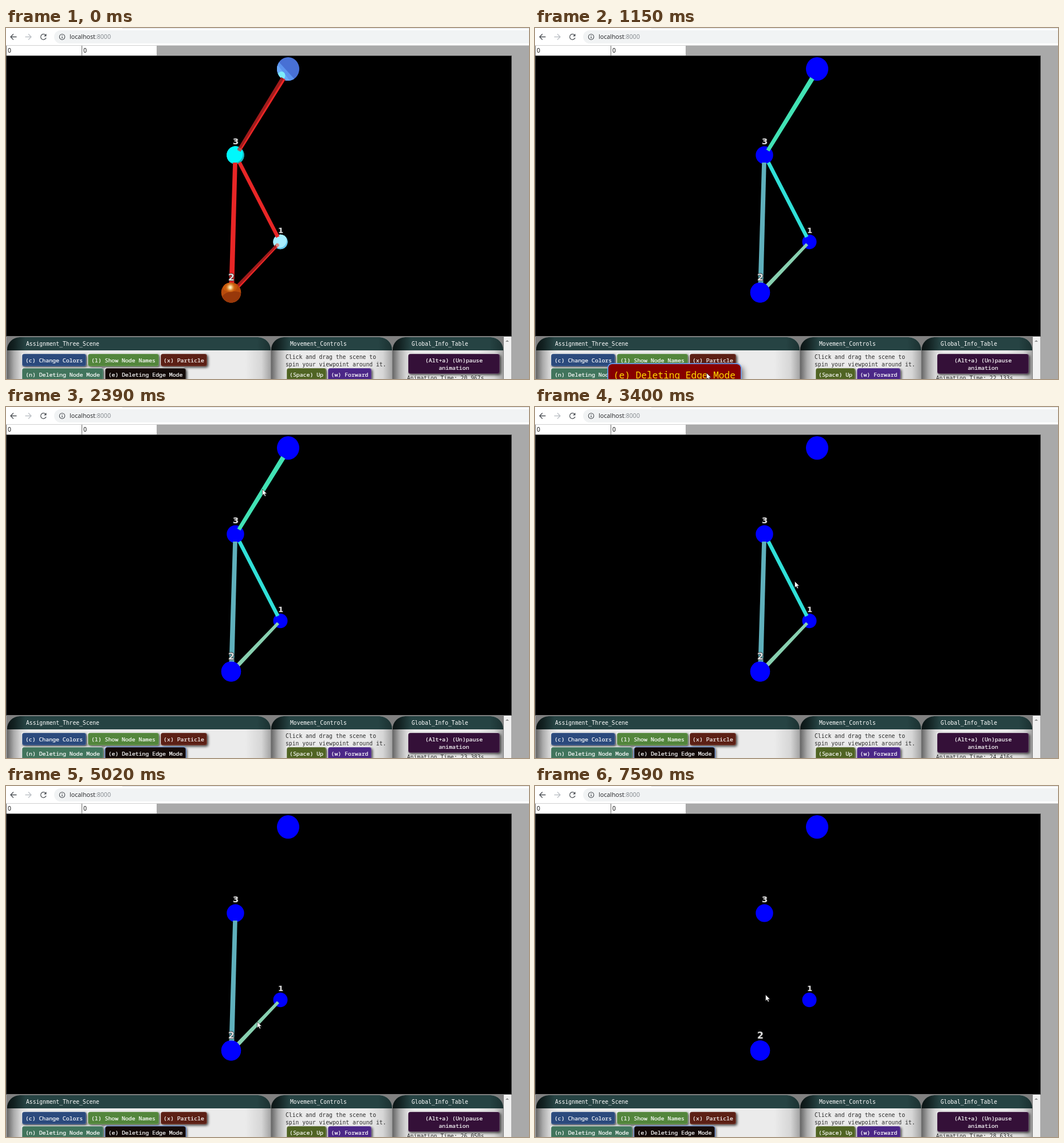
These frames come from a looping animation (913 by 613 pixels, 7.7 s). An HTML page with a canvas:

```html
<!DOCTYPE html>
<html lang="en">
<head>
<meta charset="utf-8">
<title>Scene viewer</title>
<style>
html, body { margin: 0; width: 100%; height: 100%; overflow: hidden; background: #a9a9a9; }
#stage { position: relative; width: 913px; height: 613px; overflow: hidden; background: #a9a9a9; }
#stage * { box-sizing: border-box; }
#stage > *, .panel > * { position: absolute; }
#bar { left: 0; top: 0; width: 913px; height: 31px; background: #fff; border-bottom: 1px solid #d0d0d0; }
#bar > * { position: absolute; }
#rim { left: 203px; top: 0; width: 710px; height: 1px; background: #dee1e6; }
#pill { left: 84px; top: 4px; width: 850px; height: 23px; border-radius: 12px; background: #f1f3f4; }
#url { left: 111px; top: 7px; font: 10.7px/16px "Open Sans", "Noto Sans", sans-serif; color: #202124; }
#url span { color: #80868b; }
.field { top: 31px; height: 17px; background: #fff; border-left: 1px solid #666;
  font: 10.5px/16px "Noto Sans", sans-serif; padding-left: 2px; color: #111; }
#scene { left: 1px; top: 49px; box-shadow: 0 0 0 1px #555; }
#dock { left: 1px; top: 538px; width: 868px; height: 75px; background: #808080; }
.panel { top: 540px; height: 90px; border-radius: 22px 22px 0 0; overflow: hidden;
  background: linear-gradient(90deg, #666, #acacac 12px, #d8d8d8 24px, #ebebeb 38px,
    #ebebeb calc(100% - 44px), #d6d6d6 calc(100% - 16px), #a4a4a4); }
.panel h2 { left: 0; top: 0; width: 100%; height: 23px; margin: 0; padding-left: 33px; color: #fff;
  font: 9.67px/24px "DejaVu Sans Mono", monospace;
  background: linear-gradient(90deg, #0b1414, #122121 12px, #264343 32px, #264343 calc(100% - 24px), #1b3131); }
.note { font: 9.72px/12.6px "DejaVu Sans Mono", monospace; color: #2c2c2c; white-space: pre; }
.btn { display: flex; align-items: center; justify-content: center; height: 22px; border-radius: 4px;
  border: 1px solid rgba(255, 255, 255, .2); box-shadow: 2px 2px 4px rgba(0, 0, 0, .7), -1px -1px 1px #fff;
  color: #fff; font: 500 9.83px/13px "Noto Sans Mono", "DejaVu Sans Mono", monospace;
  -webkit-text-stroke: .2px; text-align: center; white-space: pre; }
#edge.focus { outline: 1px solid #6c9cf0; }
#edge.hot { background: #870000 !important; color: #ffd700; border-color: transparent;
  box-shadow: 3px 3px 6px rgba(0, 0, 0, .5); -webkit-text-stroke: 0; }
#track { left: 869px; top: 539px; width: 13px; height: 74px; background: #f1f1f1; }
#up { left: 872px; top: 545px; border: 3px solid transparent; border-top: 0; border-bottom: 3px solid #909090; }
#cursor { left: 0; top: 0; }
</style>
</head>
<body>
<div id="stage">
  <div id="bar">
    <div id="rim"></div>
    <div id="pill"></div>
    <svg width="110" height="30" fill="none" stroke="#4d5156" stroke-width="1.3">
      <path d="M18.5 15.5H8M13 10.5L8 15.5L13 20.5"/>
      <path stroke="#bdc1c6" d="M33.5 15.5H44M39 10.5L44 15.5L39 20.5"/>
      <path d="M69 12.3A4.8 4.8 0 1 0 70 17"/>
      <path fill="#4d5156" stroke="none" d="M70.5 10V14.5H66Z"/>
      <circle cx="98" cy="15.5" r="4.7" stroke-width="1.1"/>
      <path d="M98 15V18.3M98 12.5V13.7"/>
    </svg>
    <div id="url">localhost<span>:8000</span></div>
  </div>
  <canvas id="scene" width="881" height="489"></canvas>
  <div class="field" style="left:0;width:132px">0</div>
  <div class="field" style="left:132px;width:131px">0</div>
  <div id="dock"></div>
  <div class="panel" style="left:2px;width:460px"><h2>Assignment_Three_Scene</h2></div>
  <div class="panel" style="left:463px;width:211px"><h2>Movement_Controls</h2></div>
  <div class="panel" style="left:675px;width:193px"><h2>Global_Info_Table</h2></div>
  <div class="note" style="left:488px;top:569px">Click and drag the scene to
spin your viewpoint around it.</div>
  <div class="note" id="clock" style="left:700px;top:606px"></div>
  <div class="btn" style="left:28px;top:569px;width:112px;background:#2b4a7d">(c) Change Colors</div>
  <div class="btn" style="left:143px;top:569px;width:124px;background:#53863c">(l) Show Node Names</div>
  <div class="btn" style="left:270px;top:569px;width:81px;background:#5c2015">(x) Particle</div>
  <div class="btn" style="left:28px;top:594px;width:142px;background:#41745c">(n) Deleting Node Mode</div>
  <div class="btn" style="left:490px;top:594px;width:69px;background:#506423">(Space) Up</div>
  <div class="btn" style="left:562px;top:594px;width:76px;background:#4b2787">(w) Forward</div>
  <div class="btn" style="left:702px;top:569px;width:160px;height:35px;background:#341038">(Alt+a) (Un)pause
animation</div>
  <div class="btn" id="edge" style="left:173px;top:594px;width:141px;background:#130a08">(e) Deleting Edge Mode</div>
  <div id="track"></div>
  <div id="up"></div>
  <svg id="cursor" width="12" height="18"><path d="M.5 .5V11.4L3 9.1L4.8 13L6.6 12.2L4.9 8.4H8.3Z" fill="#fff" stroke="#222" stroke-width=".7"/></svg>
</div>
<script>
const LOOP = 7700, PAINT = 990;
const $ = id => document.getElementById(id);
const ctx = $('scene').getContext('2d');
ctx.translate(-1, -49);

const nodes = [
  { x: 492.5, y: 71.5, rx: 19.5, ry: 20.5, look: '#4870d4' },
  { x: 400.5, y: 222, rx: 15.2, ry: 15.5, look: '#00f8fc', tag: '3', tx: 401, ty: 203, size: 14.5 },
  { x: 479, y: 373.5, rx: 12.5, ry: 12.8, look: '#a6eeff', tag: '1', tx: 479.5, ty: 357.5, size: 12.5 },
  { x: 393, y: 462, rx: 17.2, ry: 17.6, look: '#b84c0c', tag: '2', tx: 393.5, ty: 440.5, size: 15.5 }
];
// from, width, to, width; strip marks the lit side of a shaded edge
const edges = [
  { a: [484, 88], wa: 8.2, b: [406.5, 214], wb: 6.6, color: '#42e2b4', strip: 3, end: 2650 },
  { a: [407.5, 235], wa: 6.6, b: [474.5, 365], wb: 6.4, color: '#30e0d8', end: 3640 },
  { a: [475, 377.5], wa: 5.4, b: [404, 452], wb: 7, color: '#88d0b0', strip: 1.8, end: 5180 },
  { a: [400, 235], wa: 7.6, b: [394, 446], wb: 8.8, color: '#5fb0bc', end: 6660 }
];
const path = [
  [480, 322, 614], [720, 303, 584], [980, 299, 602], [1280, 299, 602],
  [1610, 458, 330], [2080, 447, 143], [2720, 447, 143], [3220, 453, 300],
  [3400, 453, 304], [3520, 453, 310], [4100, 453, 310], [4600, 433, 407],
  [4870, 438, 411], [5260, 438, 411], [5650, 403, 372], [6000, 398, 364],
  [6800, 398, 364], [7200, 400, 364], [7500, 402, 364], [LOOP, 402, 364]
];
const zoom = [[580, 1], [830, 1.36], [1060, 1.64], [1180, 1.64], [1280, 1.76], [1520, 1]];

// Eased value between [time, ...values] keys.
function at(keys, t) {
  if (t <= keys[0][0]) return keys[0].slice(1);
  for (let i = 1; i < keys.length; i++) {
    const [p, q] = [keys[i - 1], keys[i]];
    if (t > q[0]) continue;
    const u = (t - p[0]) / (q[0] - p[0]), e = u * u * (3 - 2 * u);
    return q.slice(1).map((v, j) => p[j + 1] + (v - p[j + 1]) * e);
  }
  return keys[keys.length - 1].slice(1);
}

function poly(color, pts) {
  ctx.fillStyle = color;
  ctx.beginPath();
  for (const p of pts) ctx.lineTo(p[0], p[1]);
  ctx.fill();
}

function oval(color, x, y, rx, ry = rx) {
  ctx.fillStyle = color;
  ctx.beginPath();
  ctx.ellipse(x, y, rx, ry, 0, 0, 7);
  ctx.fill();
}

// Tapered bar whose cross-section runs from lo to hi (-1 to 1).
function bar(e, color, lo = -1, hi = 1) {
  const dx = e.b[0] - e.a[0], dy = e.b[1] - e.a[1], len = Math.hypot(dx, dy);
  const off = (p, w, k) => [p[0] - dy / len * w / 2 * k, p[1] + dx / len * w / 2 * k];
  poly(color, [off(e.a, e.wa, lo), off(e.a, e.wa, hi), off(e.b, e.wb, hi), off(e.b, e.wb, lo)]);
}

function shade(i) {
  const n = nodes[i];
  ctx.save();
  ctx.beginPath();
  ctx.ellipse(n.x, n.y, n.rx, n.ry, 0, 0, 7);
  ctx.clip();
  if (i === 0) {
    poly('#5c94ee', [[470, 56], [477, 60], [507, 93], [470, 95]]);
    poly('#69a9fa', [[470, 64], [476, 67], [498, 95], [470, 95]]);
    oval('#7cecfa', 481, 83, 6.5, 7);
  } else if (i === 1) {
    oval('#18b4bc', n.x, n.y, 20);
    oval(n.look, n.x - 2.5, n.y - 2, 15.5);
  } else if (i === 2) {
    oval('#62c8ee', n.x, n.y, 16);
    oval(n.look, n.x - 2, n.y - 2.5, 13);
  } else {
    oval('#98380a', 398, 474, 22, 14);
    oval('#c95a0c', 391, 453, 12, 8);
    const g = ctx.createRadialGradient(391.5, 453, 0, 391.5, 453, 9);
    g.addColorStop(0, '#fffbe0');
    g.addColorStop(.3, '#f4d08c');
    g.addColorStop(1, 'rgba(216,112,16,0)');
    oval(g, 391.5, 453, 9);
  }
  ctx.restore();
}

function drawNode(i, plain) {
  const n = nodes[i];
  oval(plain ? '#00f' : n.look, n.x, n.y, n.rx, n.ry);
  if (!plain) shade(i);
}

function drawScene(t) {
  const plain = t >= PAINT;
  ctx.fillStyle = '#000';
  ctx.fillRect(0, 0, 913, 613);
  nodes.forEach((n, i) => drawNode(i, plain));
  for (const e of edges) {
    if (t >= e.end) continue;
    if (plain) bar(e, e.color);
    else if (e.strip) {
      bar(e, '#a01b1b');
      bar(e, '#ea2626', -1, -1 + 2 * e.strip / e.wa);
    } else bar(e, '#e82626');
  }
  if (!plain) {
    oval('rgba(217,170,160,.8)', 474, 379, 3.2);
    oval('rgba(140,140,135,.6)', 407, 212, 3.2);
  }
  // the nearest node covers the ends of its edges
  drawNode(3, plain);
  ctx.textAlign = 'center';
  ctx.lineJoin = 'round';
  for (const { tag, tx, ty, size } of nodes) {
    if (!tag) continue;
    ctx.font = `bold ${size}px "DejaVu Sans", sans-serif`;
    ctx.lineWidth = 2;
    ctx.strokeStyle = 'rgba(40,40,40,.8)';
    ctx.strokeText(tag, tx, ty);
    ctx.fillStyle = '#dedede';
    ctx.fillText(tag, tx, ty);
  }
}

function draw(t) {
  drawScene(t);
  const [x, y] = at(path, t), [s] = at(zoom, t);
  $('cursor').style.transform = `translate(${x}px,${y}px)`;
  $('cursor').style.visibility = t < 480 ? 'hidden' : 'visible';
  $('edge').style.transform = `scale(${s})`;
  $('edge').className = 'btn' + (t >= PAINT ? ' focus' : '') + (t > 580 && t < 1400 ? ' hot' : '');
  const step = Math.min(98, Math.floor(t / 77.45 + .3));
  const ticks = Math.floor(step * 4.694 + .475);
  $('clock').textContent = `Animation Time: ${(20.96667 + ticks * .0166656).toFixed(3)}s`;
}

const start = performance.now();
function frame() {
  draw((performance.now() - start) % LOOP);
  requestAnimationFrame(frame);
}
frame();
</script>
</body>
</html>
```
